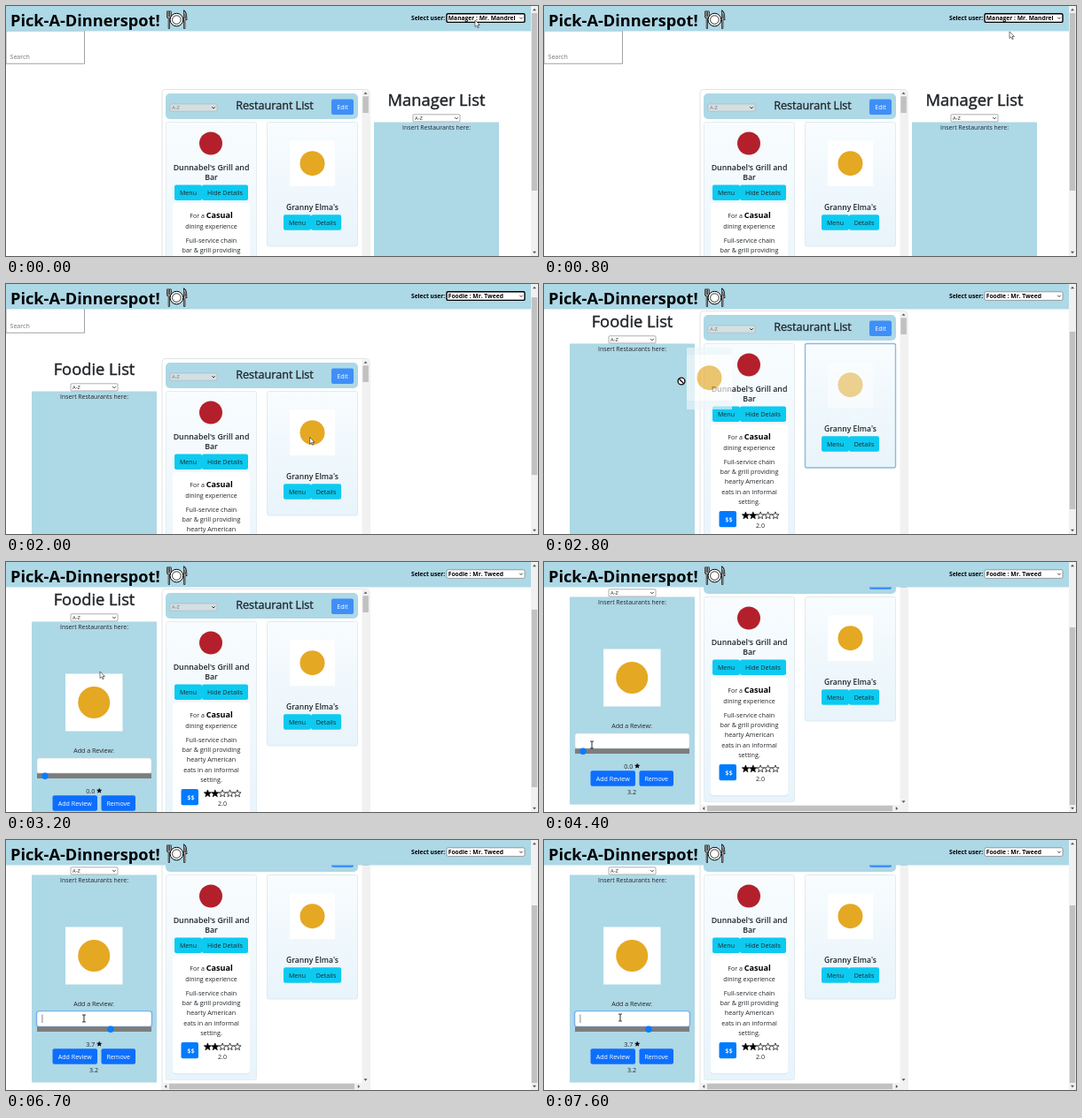
An HTML page that plays this animation: 600 px wide and 283 px high, repeating every 7700 ms.

```html
<!DOCTYPE html>
<html lang="en">
<head>
<meta charset="utf-8">
<title>Restaurant rating demo</title>
<style>
  html, body { margin: 0; width: 100%; height: 100%; overflow: hidden; background: #fff; }
  svg { display: block; width: 100%; height: 100%; font-family: "Open Sans", "Noto Sans", sans-serif; }
  text { white-space: pre; }
</style>
</head>
<body>
<svg id="stage" viewBox="0 0 600 283"></svg>
<script>
const LOOP = 7700, STEP = 100;
const SKY = '#add8e6', CYAN = '#0dcaf0', BLUE = '#0d6efd', INK = '#212529';

// Markup helpers
const rect = (x, y, w, h, fill, extra = '') =>
  `<rect x="${x}" y="${y}" width="${w}" height="${h}" fill="${fill}" ${extra}/>`;
const text = (x, y, str, size = 7.1, extra = '') =>
  `<text x="${x}" y="${y}" font-size="${size}" fill="${INK}" ${extra}>${str}</text>`;
const mid = (x, y, str, size, extra = '') => text(x, y, str, size, `text-anchor="middle" ${extra}`);
const heading = (x, y, str, size) => mid(x, y, str, size, `stroke="${INK}" stroke-width="${size * .025}"`);
const path = (d, extra = '') => `<path d="${d}" ${extra}/>`;
const dot = (x, y, r, fill, extra = '') => `<circle cx="${x}" cy="${y}" r="${r}" fill="${fill}" ${extra}/>`;
const group = (id, body, extra = '') => `<g id="${id}" ${extra}>${body}</g>`;

const chevron = (x, y) =>
  path(`M${x - 1.7} ${y - .8}l1.7 1.7 1.7-1.7`, 'fill="none" stroke="#222" stroke-width=".9"');

const button = (x, y, w, label, fill = CYAN, ink = INK, h = 17.5) =>
  rect(x, y, w, h, fill, 'rx="2"') + mid(x + w / 2, y + h / 2 + 2.6, label, 7.1, `style="fill:${ink}"`);

function sortBox(x, y, off) {
  const look = off ? 'stroke="#a9b4b8"' : 'stroke="#777"';
  return rect(x, y, 53, 8.2, off ? '#d3dfe3' : '#fff', `rx="1" stroke-width=".6" ${look}`) +
    text(x + 2, y + 6.2, 'A-Z', 5.8, off ? 'style="fill:#70787c"' : '') + chevron(x + 49, y + 4.1);
}

function star(x, y, r, filled) {
  let d = '';
  for (let i = 0; i < 10; i++) {
    const a = i * Math.PI / 5, k = i % 2 ? r * .42 : r;
    d += `${i ? 'L' : 'M'}${(x + k * Math.sin(a)).toFixed(2)} ${(y - k * Math.cos(a)).toFixed(2)}`;
  }
  return path(d + 'z', `fill="${filled ? '#000' : '#fff'}" stroke="#000" stroke-width=".7"`);
}

const arrowTip = (x, y, turn, fill = '#555') =>
  path('M-2 1.2L0-1.2 2 1.2z', `fill="${fill}" transform="translate(${x} ${y}) rotate(${turn})"`);

const brandTile = (x, y, w, h, r) => rect(x, y, w, h, '#fff') + dot(x + w / 2, y + h / 2, r, '#e5a823');

// Page sections
function listColumn(x, title) {
  const c = x + 70.5;
  return heading(c, 113, title, 18.3) + rect(x, 131.5, 141, 235, SKY) +
    sortBox(x + 44, 122.8) + mid(c, 140.4, 'Insert Restaurants here:', 6.9);
}

function grillCard() {
  const lines = ['Full-service chain', 'bar &amp; grill providing', 'hearty American', 'eats in an informal', 'setting.'];
  return rect(180.5, 131.5, 102, 232, 'url(#card)', 'rx="2" stroke="#dbe6ec" stroke-width=".7"') +
    dot(231, 155.5, 13, '#b3202c') +
    mid(231.5, 185.5, "Dunnabel's Grill and", 8.8, 'font-weight="600"') +
    mid(231.5, 196.7, 'Bar', 8.8, 'font-weight="600"') +
    button(190, 202.6, 31, 'Menu') + button(221, 202.6, 52, 'Hide Details') +
    rect(188, 223.6, 87, 133.6, '#c9d8e0', 'rx="4" opacity=".6"') +
    rect(188, 223, 87, 133.2, '#fff', 'rx="4"') +
    mid(231.5, 240, 'For a <tspan font-size="9.1" font-weight="700" fill="#000">Casual</tspan>', 7.1) +
    mid(231.5, 251.9, 'dining experience', 7.1) +
    lines.map((s, i) => mid(231.5, 268 + i * 11.2, s, 7.2)).join('') +
    rect(197.5, 321, 19.5, 18.3, '#007bff', 'rx="2"') +
    mid(208.4, 333, '$$', 7.4, 'font-weight="600" style="fill:#fff"') +
    [0, 1, 2, 3, 4].map(i => star(227.4 + i * 8.4, 326.2, 4.3, i < 2)).join('') +
    mid(244, 340.2, '2.0', 7.1);
}

function bakeryCard() {
  return rect(294.5, 131.5, 102, 140.5, 'url(#card)', 'rx="2" stroke="#d5e3eb" stroke-width=".7" id="bakery"') +
    group('tile', brandTile(320, 152.3, 51, 51.7, 14)) +
    mid(345.5, 230.5, "Granny Elma's", 8.6, 'font-weight="600"') +
    button(313, 236.2, 31, 'Menu') + button(344, 236.2, 34, 'Details');
}

function restaurantPanel() {
  return path('M176 375V99q0-4.5 4.5-4.5H405.5q4.5 0 4.5 4.5V375', 'fill="#fff" stroke="#d9dcde" stroke-width=".8"') +
    rect(180, 99, 217, 29, SKY, 'rx="5"') +
    sortBox(185, 111, true) + heading(303, 117, 'Restaurant List', 12.6) +
    button(367, 105.5, 25, 'Edit', '#3f8ff7', '#fff') +
    grillCard() + bakeryCard() +
    rect(401.5, 95.5, 8, 279.5, '#f1f1f1') + rect(402.3, 102.3, 6.6, 18.7, '#c1c1c1') +
    arrowTip(405.5, 98.6, 0) + arrowTip(405.5, 363.5, 180) +
    rect(176.5, 367, 225, 8, '#f1f1f1') + rect(184, 367.8, 209, 6.4, '#c1c1c1') +
    arrowTip(180, 371, -90) + arrowTip(398, 371, 90);
}

function reviewItem() {
  return brandTile(67, 190.5, 64.5, 65, 18) +
    mid(99, 279.8, 'Add a Review:', 7.1) +
    rect(33.8, 284.9, 131.4, 19.2, BLUE, 'rx="3.5" opacity=".35" id="inputGlow"') +
    rect(35, 286, 129, 17, '#fff', 'rx="2.5" stroke="#ced4da" stroke-width=".6" id="input"') +
    rect(40.6, 289.5, .7, 9.5, '#555', 'id="caret"') +
    rect(33.6, 301.8, 131.8, 8.6, '#86b7fe', 'rx="1.5" id="trackGlow"') +
    rect(35, 303.2, 129, 5.8, '#7d7d7d', 'rx=".5"') +
    dot(44, 306.2, 3.7, '#0a7cff', 'id="thumb"') +
    text(90.3, 325.8, '0.0', 7.1, 'id="score"') + star(105.2, 323, 2.6, true) +
    button(52.5, 328.2, 50.5, 'Add Review', BLUE, '#fff') + button(107.5, 328.2, 38.5, 'Remove', BLUE, '#fff') +
    mid(99, 354.6, '3.2', 7.1);
}

function dishIcon() {
  const fork = 'M182.2 6.5v4.7q0 1.8 1.7 1.8T185.600 11.2V6.500M183.900 6.500v18.500';
  const knife = 'M201.200 25V6.500q2 1.500 2 8.500h-2';
  const cutlery = (color, width) =>
    path(fork + knife, `fill="none" stroke="${color}" stroke-width="${width}" stroke-linecap="round"`);
  return cutlery('#000', 2.2) + cutlery('#fff', .7) +
    dot(192.4, 15.6, 7.3, '#fff', 'stroke="#000" stroke-width="1"') +
    dot(192.4, 15.6, 4.8, '#fff', 'stroke="#000" stroke-width=".8"');
}

function header() {
  return rect(0, 0, 592, 28.5, SKY) +
    text(5, 22.5, 'Pick-A-Dinnerspot!', 18.2, 'font-weight="700" style="fill:#000"') + dishIcon() +
    text(457, 16.1, 'Select user:', 6.65, 'font-weight="700" style="fill:#000"') +
    rect(497, 8.8, 88, 9.6, '#fff', 'rx="1.5" id="userBox"') +
    text(498.8, 16.2, '', 6.7, 'font-weight="700" style="fill:#000" id="user"') + chevron(581, 13.6);
}

const cursors = {
  arrow: path('M0 0v7.6l1.8-1.6 1.3 2.8 1.2-.6-1.3-2.7h2.4z', 'fill="#fff" stroke="#222" stroke-width=".6"'),
  deny: dot(0, 0, 3.9, '#fff', 'stroke="#111" stroke-width="1.4"') + path('M-2.7-2.7L2.7 2.7', 'stroke="#111" stroke-width="1.4"'),
  beam: path('M-1.9-4H-.6Q0-4 0-3.3V3.3Q0 4-.6 4H-1.9M1.9-4H.6Q0-4 0-3.3M0 3.3Q0 4 .6 4H1.9', 'fill="none" stroke="#111" stroke-width=".9"'),
  hand: path('M0 0c.8 0 1 .5 1 1.2v2.6l3 .8c.8.3 1 .8.8 1.8l-.8 2.6h-4l-2.6-3.4c0-.9.8-1 1.4-.4l.5.5V1.2C-.7.5-.6 0 0 0z', 'fill="#fff" stroke="#111" stroke-width=".7"')
};

document.getElementById('stage').innerHTML =
  `<defs><linearGradient id="card" x2="0" y2="1"><stop stop-color="#f8fcfe"/><stop offset="1" stop-color="#e8f4fb"/></linearGradient></defs>` +
  rect(0, 0, 600, 283, '#fff') +
  group('page',
    rect(0, 28, 88.4, 37.2, '#fff', 'stroke="#8b8b8b" stroke-width=".8"') +
    text(4.5, 60.3, 'Search', 7.1, 'style="fill:#777"') +
    group('manager', listColumn(415, 'Manager List')) +
    group('foodie', listColumn(29, 'Foodie List') + group('review', reviewItem())) +
    restaurantPanel()) +
  header() +
  rect(592, 0, 8, 283, '#f1f1f1') + rect(592.8, 8, 6.4, 201, '#c1c1c1', 'id="bar"') +
  arrowTip(596, 4, 0) + arrowTip(596, 279, 180) +
  group('ghost', rect(320, 80, 51, 70, '#eef6fa') + brandTile(320, 88.3, 51, 51.7, 14), 'opacity=".65"') +
  Object.entries(cursors).map(([id, body]) => group(id, body)).join('');

// Motion: [time, value...] rows, eased between rows
const scrollKeys = [[1900, 0], [2300, 64], [3500, 64], [3900, 92]];
const thumbKeys = [[4900, 44], [5600, 118]];
const pointerKeys = [
  [0, 529, 16], [400, 529, 16], [800, 525, 29], [1000, 525, 30], [1300, 523, 41],
  [1600, 388, 106], [1700, 345, 180], [1900, 345, 180], [2400, 322, 118], [2500, 322, 118],
  [2800, 155, 110], [3100, 106, 124], [3500, 106, 124], [4200, 56, 203], [4400, 54, 207],
  [4800, 44, 215], [4900, 44, 215], [5600, 118, 215], [6000, 118, 215], [6600, 88, 202], [7600, 86, 201]
];

function track(keys, t) {
  if (t <= keys[0][0]) return keys[0].slice(1);
  const i = keys.findIndex(k => k[0] > t);
  if (i < 0) return keys[keys.length - 1].slice(1);
  const a = keys[i - 1], b = keys[i];
  const u = (t - a[0]) / (b[0] - a[0]), e = u * u * (3 - 2 * u);
  return a.slice(1).map((v, n) => v + (b[n + 1] - v) * e);
}

const el = id => document.getElementById(id);
const set = (id, attrs) => { for (const k in attrs) el(id).setAttribute(k, attrs[k]); };
const show = (id, on) => set(id, { display: on ? 'inline' : 'none' });

function pointerKind(t) {
  if (t >= 2500 && t < 3100) return 'deny';
  if (t >= 4800 && t < 6300) return 'hand';
  return t >= 4200 ? 'beam' : 'arrow';
}

function draw(t) {
  const [scroll] = track(scrollKeys, t), [thumb] = track(thumbKeys, t), [x, y] = track(pointerKeys, t);
  const foodie = t >= 1000, dragging = t >= 2500 && t < 3100, picked = t < 2400, typing = t >= 6600;

  set('page', { transform: `translate(0 ${-scroll})` });
  set('bar', { y: 8 + scroll * 66 / 92 });
  show('manager', !foodie);
  show('foodie', foodie);
  el('user').textContent = foodie ? 'Foodie : Mr. Tweed' : 'Manager : Mr. Mandrel';
  set('userBox', { stroke: picked ? '#000' : '#777', 'stroke-width': picked ? 1.4 : .7 });

  show('ghost', dragging);
  set('ghost', { transform: `translate(${x - 314} ${y - 118})` });
  set('bakery', { stroke: dragging ? '#8fb9dc' : '#d5e3eb', 'stroke-width': dragging ? 1.4 : .7 });
  set('tile', { opacity: dragging ? .5 : 1 });

  show('review', t >= 3100);
  set('thumb', { cx: thumb });
  el('score').textContent = ((thumb - 44) / 20).toFixed(1);
  show('trackGlow', t >= 4900 && !typing);
  show('inputGlow', typing);
  set('input', { stroke: typing ? '#86b7fe' : '#ced4da' });
  show('caret', typing && Math.floor((t - 6600) / 500) % 2 === 0);

  const kind = pointerKind(t);
  for (const id in cursors) show(id, id === kind);
  set(kind, { transform: `translate(${x} ${y})` });
}

const start = performance.now();
function tick() {
  const t = (performance.now() - start) % LOOP;
  draw(Math.floor(t / STEP) * STEP);
  requestAnimationFrame(tick);
}
tick();
</script>
</body>
</html>
```
